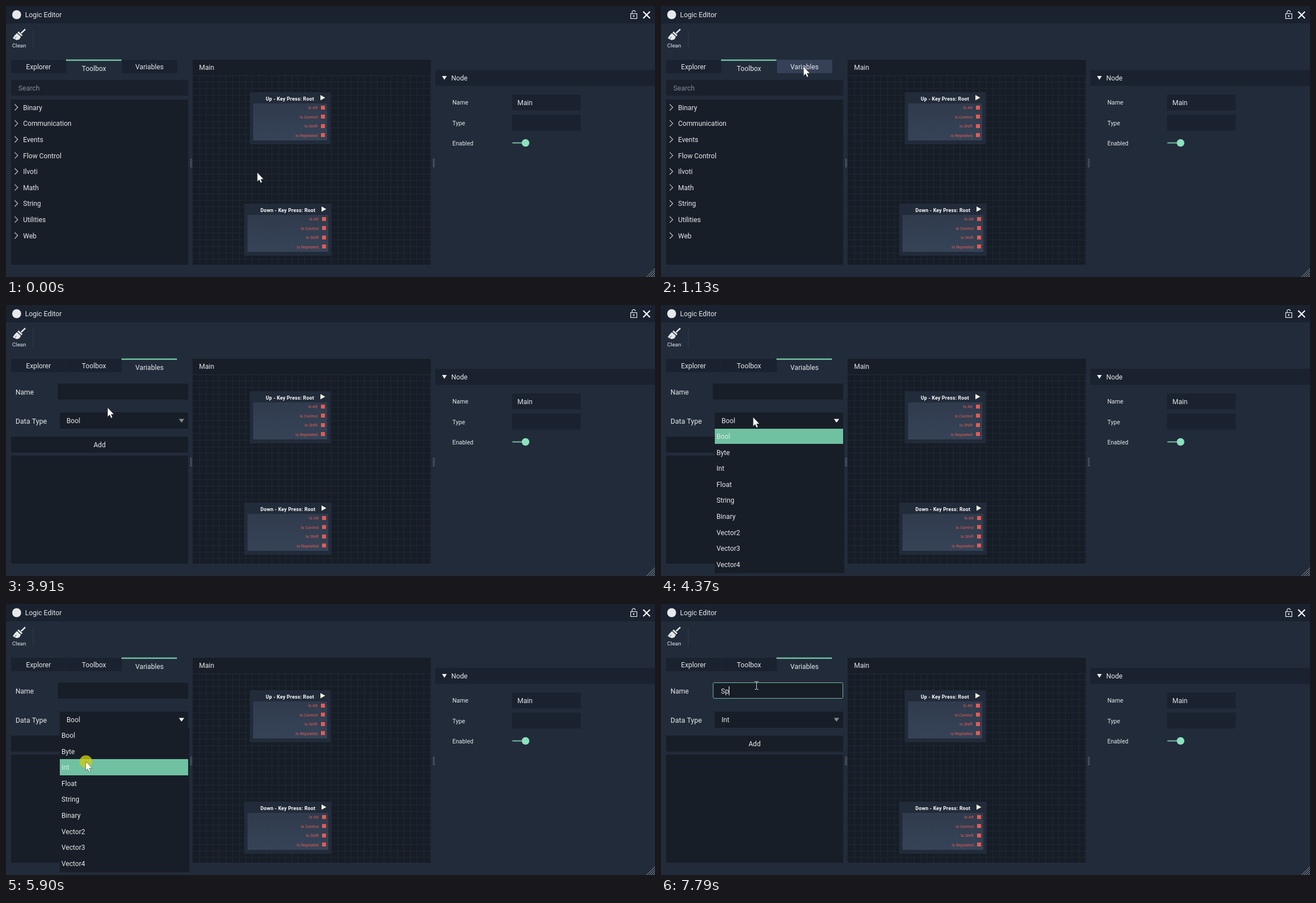
Animation, 1158 px wide and 484 px high, one loop 7990 ms. Source, as an HTML page with a canvas:

```html
<!DOCTYPE html>
<html lang="en">
<head>
<meta charset="utf-8">
<title>Logic Editor</title>
<style>
  html, body { margin: 0; width: 100%; height: 100%; overflow: hidden; background: #222b3a; }
  canvas { display: block; width: 1158px; height: 484px; }
</style>
</head>
<body>
<canvas id="stage" width="1158" height="484"></canvas>
<script>
const ctx = document.getElementById('stage').getContext('2d');
const LOOP = 7990;
const ROW = 28.63;
const C = {
  body: '#222b3a', bar: '#1a2230', dark: '#181e27', field: '#1a212c', hover: '#364158',
  line: '#1f2833', green: '#70c1a2', text: '#e6e8ea', dim: '#858b95', red: '#e65b53', cream: '#f6f5dc'
};
const TOOLS = ['Binary', 'Communication', 'Events', 'Flow Control', 'Ilvoti', 'Math', 'String', 'Utilities', 'Web'];
const TYPES = ['Bool', 'Byte', 'Int', 'Float', 'String', 'Binary', 'Vector2', 'Vector3', 'Vector4'];

// Pointer path: time, x, y
const PATH = [
  [0, 448, 297], [200, 448, 297], [330, 420, 268], [700, 310, 162], [850, 275, 130],
  [1000, 259, 115], [1050, 258, 113], [1130, 254, 108], [2470, 254, 108], [2480, 251, 111],
  [2530, 250, 112], [2800, 215, 160], [3120, 187, 203], [3620, 187, 203], [3910, 181, 183],
  [4010, 181, 183], [4220, 164, 200], [4590, 164, 200], [4850, 160, 245], [5060, 157, 306],
  [5110, 157, 307], [5210, 154, 341], [5390, 145, 288], [5540, 142, 281], [6000, 142, 281], [6260, 170, 145]
];
const CLICKS = [[1870, 2020], [4220, 4370], [5800, 6000], [6560, 6670]];
const SWITCH = 1920, OPEN = 4320, CLOSE = 6000, FOCUS = 6560;

const within = (t, a, b) => t >= a && t < b;

function pointer(t) {
  const i = PATH.findIndex(p => p[0] > t);
  if (i < 0) return PATH[PATH.length - 1].slice(1);
  const [a, b] = [PATH[i - 1], PATH[i]];
  const k = (t - a[0]) / (b[0] - a[0]);
  return [a[1] + (b[1] - a[1]) * k, a[2] + (b[2] - a[2]) * k];
}

function rect(x0, y0, x1, y1, fill) {
  ctx.fillStyle = fill;
  ctx.fillRect(x0, y0, x1 - x0, y1 - y0);
}

function poly(points, fill) {
  ctx.beginPath();
  points.forEach(([x, y]) => ctx.lineTo(x, y));
  ctx.closePath();
  ctx.fillStyle = fill;
  ctx.fill();
}

function stroke(points, color, width) {
  ctx.beginPath();
  points.forEach(([x, y]) => ctx.lineTo(x, y));
  ctx.strokeStyle = color;
  ctx.lineWidth = width;
  ctx.stroke();
}

function disc(x, y, r, fill) {
  ctx.beginPath();
  ctx.arc(x, y, r, 0, Math.PI * 2);
  ctx.fillStyle = fill;
  ctx.fill();
}

// y is the vertical centre of the capitals
function text(s, x, y, { size = 12.2, color = C.text, align = 'left', weight = 400, gap = 0 } = {}) {
  ctx.font = `${weight} ${size}px Roboto, sans-serif`;
  ctx.letterSpacing = gap + 'px';
  ctx.textAlign = align;
  ctx.fillStyle = color;
  ctx.fillText(s, x, y + size * 0.36);
}

function titleBar() {
  rect(0, 0, 1158, 31, C.bar);
  disc(19, 15.5, 8, C.text);
  text('Logic Editor', 34, 15.8, { size: 12.4 });

  ctx.strokeStyle = C.text;
  ctx.lineWidth = 1.2;
  ctx.strokeRect(1114.6, 13.6, 11, 8.8);
  ctx.beginPath();
  ctx.arc(1120, 11, 2.9, Math.PI, 0);
  ctx.moveTo(1117.1, 11);
  ctx.lineTo(1117.1, 13.6);
  ctx.stroke();
  disc(1120, 18, 1.4, C.text);
  stroke([[1137, 10], [1149, 22]], '#fff', 2.2);
  stroke([[1149, 10], [1137, 22]], '#fff', 2.2);
}

function toolbar() {
  stroke([[34.5, 41.5], [27, 48.5]], C.text, 2.4);
  poly([[22.5, 45.5], [29.5, 52], [27.5, 54], [20.5, 47.5]], C.text);
  poly([[19.5, 48.5], [26.5, 55], [24, 59.5], [19, 61], [12, 57.5], [15.5, 52.5]], C.text);
  stroke([[16, 58], [18.5, 55]], C.body, 0.8);
  text('Clean', 23.5, 70.3, { size: 9.9, align: 'center' });
  rect(48, 43, 49, 75, '#323c4b');
}

function tabs(active, hover) {
  ['Explorer', 'Toolbox', 'Variables'].forEach((name, i) => {
    const x = 9 + i * 99;
    const on = i === active;
    if (on) rect(x - 1, 95.5, x + 98, 98, C.green);
    else rect(x, 96, x + 98.5, 120, i === hover ? C.hover : C.bar);
    text(name, x + 49, on ? 111.3 : 108.3, { align: 'center' });
  });
}

function toolbox(hoverRow) {
  rect(9, 132, 325, 160, C.field);
  text('Search', 22, 146.5, { color: C.dim, size: 12.4 });
  rect(9, 167, 325, 462, C.dark);
  TOOLS.forEach((name, i) => {
    const y = 181 + i * ROW;
    if (i === hoverRow) rect(9, y - 14, 325, y + 14.5, '#273142');
    stroke([[15.5, y - 5.5], [21, y], [15.5, y + 5.5]], '#c3c7cc', 1.2);
    text(name, 30.5, y + 0.3);
  });
}

function variables(t) {
  const open = within(t, OPEN, CLOSE);
  text('Name', 17, 155.3);
  rect(92.5, 140.5, 325, 169, C.dark);
  text('Data Type', 17, 207, { size: 12.6 });
  rect(96, 192, 325, 221, C.dark);
  text(t < CLOSE ? 'Bool' : 'Int', 108, 206.8);
  poly([[308.5, 203.5], [318, 203.5], [313.2, 210]], within(t, OPEN, FOCUS) ? '#f2f3f4' : C.dim);
  rect(9, 235, 325, 263.5, C.dark);
  text('Add', 167, 249.8, { align: 'center' });
  rect(9, 269, 325, 462, C.dark);

  if (t >= FOCUS) nameInput(t);
  if (open) dropdown(t);
}

function nameInput(t) {
  ctx.strokeStyle = C.green;
  ctx.lineWidth = 1;
  ctx.beginPath();
  ctx.roundRect(93, 140.5, 231.5, 28, 2);
  ctx.stroke();
  const typed = 'Sp'.slice(0, (t >= 7560) + (t >= 7790));
  text(typed, 107, 155.3);
  if (!within(t, 7050, 7560)) rect(107 + typed.length * 7, 147, 108 + typed.length * 7, 163, '#fff');
}

function dropdown(t) {
  rect(96, 221, 327, 479, C.dark);
  const y = pointer(t - 50)[1];
  const row = Math.max(0, Math.floor((y - 219.7) / ROW));
  TYPES.forEach((name, i) => {
    const mid = 234.3 + i * ROW;
    if (i === row) rect(96, Math.max(221, Math.round(mid - 14.5)), 325, Math.round(mid + 14), C.green);
    text(name, 99, mid + 0.2, { color: i === row ? '#d3eee3' : C.text });
  });
}

function node(title, x0, y0, x1, titleX, portX) {
  rect(x0, y0, x1, y0 + 93, C.body);
  const fill = ctx.createLinearGradient(0, y0 + 20, 0, y0 + 86);
  fill.addColorStop(0, '#303b4d');
  fill.addColorStop(1, '#364357');
  rect(x0 + 6, y0 + 20, x1 - 6, y0 + 86, fill);
  text(title, titleX, y0 + 11.5, { size: 8.8, weight: 700, gap: 0.25, color: '#fff' });
  poly([[portX - 4, y0 + 5], [portX + 4.5, y0 + 9.7], [portX - 4, y0 + 14.4]], C.cream);
  ['Is Alt', 'Is Control', 'Is Shift', 'Is Repeated'].forEach((name, i) => {
    const y = y0 + 27.3 + i * 16.5;
    text(name, portX - 9, y + 0.3, { size: 7.5, color: C.red, align: 'right' });
    rect(portX - 3, Math.round(y - 3.5), portX + 4, Math.round(y + 3.5), C.red);
  });
}

function graph() {
  rect(333, 96, 758, 124, C.dark);
  text('Main', 344.5, 109.5);
  rect(333, 124, 758, 462, '#171d26');
  for (let x = 345; x < 758; x += 11.75) rect(Math.round(x), 124, Math.round(x) + 1, 462, C.line);
  for (let y = 135; y < 462; y += 11.75) rect(333, Math.round(y), 758, Math.round(y) + 1, C.line);
  rect(333, 124, 758, 125, '#232c39');
  node('Up - Key Press: Root', 435, 154, 579, 463.5, 565);
  node('Down - Key Press: Root', 425, 353, 581, 454, 567);
}

function splitter(x) {
  for (let y = 273; y < 289; y += 2) {
    rect(x - 1, y, x, y + 1, '#a0a6ae');
    rect(x + 1, y, x + 2, y + 1, '#767e8a');
  }
}

function inspector() {
  const small = { size: 10.7 };
  rect(766, 114, 1158, 142.5, C.bar);
  poly([[778, 125], [786.5, 125], [782.2, 131.8]], '#f2f3f4');
  text('Node', 794.5, 128.5);
  text('Name', 796.5, 172.5, small);
  text('Type', 796.5, 209.3, small);
  text('Enabled', 796.5, 245, { size: 10.5 });
  rect(903, 158, 1025.5, 186.5, C.bar);
  rect(903, 194, 1025.5, 222.5, C.bar);
  text('Main', 912.5, 172.5);
  rect(903.5, 243.5, 922, 245.5, C.green);
  disc(927, 244.5, 6.8, '#8de1be');
}

function grip() {
  for (let d = 3; d <= 15; d += 4) stroke([[1158 - d, 484], [1158, 484 - d]], '#949ba5', 1);
}

function arrow(x, y) {
  const shape = [[0, 0], [0, 16.5], [3.7, 13], [6.1, 18.6], [8.7, 17.5], [6.3, 12], [11.3, 12]];
  ctx.save();
  ctx.translate(x + 0.3, y + 0.3);
  ctx.lineJoin = 'round';
  poly(shape, '#fff');
  stroke([...shape, shape[0]], 'rgba(12,15,20,.65)', 0.7);
  ctx.restore();
}

function beam(x, y) {
  const color = '#d4d7da';
  x = Math.round(x);
  y = Math.round(y);
  rect(x, y - 6, x + 1, y + 7, color);
  for (const edge of [y - 7, y + 7]) {
    rect(x - 3, edge, x, edge + 1, color);
    rect(x + 1, edge, x + 4, edge + 1, color);
  }
}

function draw(t) {
  const [x, y] = pointer(t);
  const vars = t >= SWITCH;
  rect(0, 0, 1158, 484, C.body);
  titleBar();
  toolbar();
  graph();
  inspector();
  splitter(330);
  splitter(763);
  grip();

  const overTab = x > 207 && x < 306 && y > 96 && y < 121;
  tabs(vars ? 2 : 1, overTab ? 2 : -1);
  if (vars) variables(t);
  else toolbox(x < 325 && y > 167 ? Math.floor((y - 167) / ROW) : -1);

  if (CLICKS.some(([a, b]) => within(t, a, b))) disc(x + 0.5, y + 0.5, 11.2, 'rgba(205,205,15,.78)');
  const overField = x < 325 && (vars ? y > 140 && y < 169 : y > 132 && y < 160);
  (overField ? beam : arrow)(x, y);
}

function tick(now) {
  draw(now % LOOP);
  requestAnimationFrame(tick);
}
draw(0);
requestAnimationFrame(tick);
</script>
</body>
</html>
```
